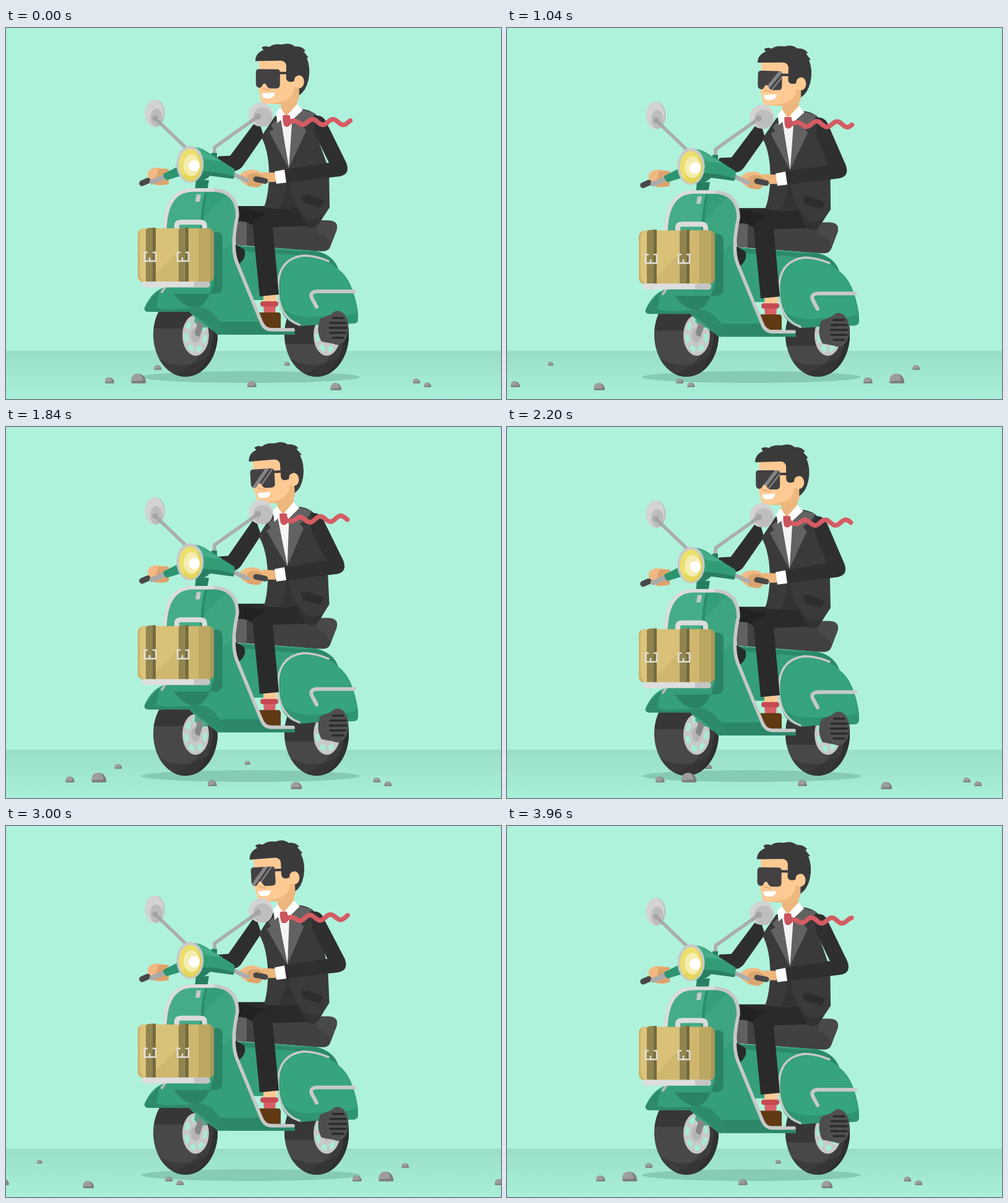
An HTML page that plays this animation: 800 by 600 pixels, repeating every 4 s.

```html
<!DOCTYPE html>
<html lang="en">
<head>
<meta charset="utf-8">
<title>Scooter ride</title>
<style>
html, body { margin: 0; width: 100%; height: 100%; overflow: hidden; background: #aff2dc; }
svg { display: block; width: 100vw; height: 100vh; }
.line { fill: none; stroke-linecap: round; stroke-linejoin: round; }
</style>
</head>
<body>
<svg viewBox="0 0 800 600">
<defs>
  <linearGradient id="road" x2="0" y2="1"><stop stop-color="#98dfc6"/><stop offset="1" stop-color="#a9f0d8"/></linearGradient>
  <clipPath id="tireClip"><ellipse cx="290" cy="496" rx="52" ry="68"/></clipPath>
  <clipPath id="bagClip"><rect x="213" y="324" width="123" height="87" rx="10"/></clipPath>
  <path id="lens" d="M408 67H437Q442 67 442 72V92Q442 98 436 98H427Q423 98 421 94Q417 86 413 94Q412 97 408 97Q403 96 403 90V72Q403 67 408 67Z"/>
  <clipPath id="lensClip"><use href="#lens"/></clipPath>
  <g id="tire" clip-path="url(#tireClip)">
    <rect x="238" y="425" width="106" height="140" fill="#484848"/>
    <path d="M342 425V565H245Q320 555 325 490L318 425Z" fill="#3c3c3c"/>
    <path d="M342 475V565H300Q345 530 332 455H342Z" fill="#303030"/>
    <path d="M238 530Q285 560 328 530V566H238Z" fill="#2f2f2f" opacity=".5"/>
  </g>
  <g id="rim">
    <g transform="translate(306.500 497) scale(.65 1)">
      <circle r="33" fill="#c8c8c8"/>
      <circle class="spokes" r="23.500" fill="none" stroke="#a4edd3" stroke-width="9" stroke-dasharray="13 8.090"/>
      <path d="M0-33A33 33 0 0 1 30-13L12-12L-4-22Z" fill="#2f8c6c" opacity=".7"/>
      <circle r="12" fill="#b5b5b5"/>
    </g>
    <path d="M312 470L319 482L313 499Q306 500 305 492Z" fill="#878787"/>
  </g>
</defs>

<rect width="800" height="600" fill="#aff2dc"/>
<rect y="522" width="800" height="78" fill="url(#road)"/>
<g id="farStones"></g>
<ellipse cx="395" cy="564.500" rx="177" ry="9.500" fill="#86cbb2"/>
<g transform="translate(212 0)">
  <use href="#tire"/>
  <g clip-path="url(#tireClip)"><rect class="shade" x="236" width="110" height="111" fill="#262626" opacity=".5"/></g>
  <use href="#rim"/>
</g>
<use href="#tire"/>
<g clip-path="url(#tireClip)"><rect class="shade" x="236" width="110" height="86" fill="#262626" opacity=".5"/></g>
<use href="#rim"/>

<g id="ride">
  <!-- rear body and seat -->
  <path d="M372 352L500 360Q529 367 537 390Q561 407 569 460V470Q569 478 561 478H520L476 482Q443 470 439 425L425 400V440H395L372 400Z" fill="#349f79"/>
  <path d="M470 361L500 361Q529 367 537 390Q520 372 480 368L376 360V352Z" fill="#2b8969"/>
  <path d="M371 350L385 358Q390 372 375 383L368 370Z" fill="#262c2a"/>
  <path d="M443 430Q442 374 480 371Q515 372 537 390Q558 414 564 450Q568 470 535 465L510 478Q450 482 443 430Z" fill="#36a47d"/>
  <path d="M443 450Q465 473 510 466Q550 468 567 460L569 470Q569 478 561 478L475 481Q450 477 443 450Z" fill="#2e9472"/>
  <path class="line" d="M521 377Q500 368 480 368Q444 373 440 410Q436 466 474 480" stroke="#c8c9c8" stroke-width="3.500"/>
  <path d="M370 313H520Q539 311 534 328L524 354Q521 362 509 361L372 351Z" fill="#414141"/>
  <path d="M370 313H389V352L372 351Z" fill="#606060"/>
  <path d="M500 311H520Q539 311 534 328L524 350Q519 334 505 332Z" fill="#494949"/>
  <path class="line" d="M563 426H503Q489 427 495 438L502 451" stroke="#c7c9c8" stroke-width="6"/>
  <path d="M508 470Q500 490 510 507L536 512V459Z" fill="#4d4d4d"/>
  <ellipse cx="536" cy="485" rx="17.500" ry="27.500" fill="#505050"/>
  <path class="line" d="M528 469H545M524 477H549M523 485H550M524 493H549M528 501H545" stroke="#2b2b2b" stroke-width="3.500"/>

  <!-- legs -->
  <path d="M416 428H437V446H416Z" fill="#fdc993"/>
  <path d="M416 448H436L435 462H417Z" fill="#d95f66"/>
  <rect x="411" y="442" width="29" height="8.500" rx="4" fill="#c74953"/>
  <path d="M407 460H441Q445 461 444 470V485H418Z" fill="#613a14"/>
  <path d="M374 288H430V318H396Q390 312 374 313Z" fill="#222"/>
  <path d="M376 289H475L497 320L431 322L441 431L410 434L398 313L420 300Z" fill="#2a2a2a"/>

  <!-- rider -->
  <g class="lean">
    <path d="M407 146L362 207L343 208L338 216L360 231Q374 234 382 224L416 175Z" fill="#2e2e2e"/>
    <path d="M434 143L412 176Q425 200 425 240Q424 272 417 290Q445 295 470 291L485 320Q495 327 504 319L523 290L522 238L508 152Q502 134 478 131Z" fill="#3a3a3a"/>
    <path d="M455 224Q456 272 441 292L470 291L485 320Q495 327 504 319L512 306Q485 317 476 294Q460 285 455 224Z" fill="#323232"/>
    <path d="M478 270L488 269L514 279L508 290L481 282Z" fill="#2d2d2d"/>
    <path d="M442 140H466L457 227Z" fill="#f3f3f3"/>
    <path d="M436 150L428 157L432 164L425 168L456 226L444 150ZM462 148L478 132L499 138L494 146L479 159L485 166L457 226Z" fill="#626262"/>
    <path d="M445 116H470V127L453 142L443 132Z" fill="#edb67c"/>
    <path d="M443 129L436 137L438 154L452 142ZM470 123L479 133L462 149L454 141Z" fill="#fff"/>
    <g id="head">
      <path d="M408 52H474V104Q472 122 450 123H418Q410 121 411 112L407 99L410 95Z" fill="#fdca94"/>
      <path d="M473 94V112Q470 124 445 124L420 122Q465 122 465 96Z" fill="#efb87e"/>
      <path d="M402 54Q402 41 415 36L412 32Q417 28 424 31Q432 25 445 27Q458 23 466 30Q477 29 483 37L480 38L488 48L485 48Q492 65 488 84Q484 102 473 109V78Q465 76 465 86Q454 90 452 82V61Q451 54 444 53Z" fill="#3a3a3a"/>
      <ellipse cx="473" cy="87" rx="8" ry="10.500" fill="#fdca94"/>
      <path d="M440 73H474" stroke="#3d3b3d" stroke-width="4"/>
      <path d="M414 98L425 101" class="line" stroke="#e7ae76" stroke-width="2"/>
      <use href="#lens" fill="#434143"/>
      <g clip-path="url(#lensClip)"><path id="glare" d="M0 98L25 66H32L7 98ZM11 98L36 66H39L14 98Z" fill="#858585"/></g>
      <path d="M413 106Q424 105 434 105Q433 114 424 114H419Q413 113 413 106Z" fill="#fff"/>
    </g>
  </g>
  <path id="gap" fill="#aff2dc"/>
  <path id="arm" fill="#2f2f2f"/>
  <g class="lean">
    <path id="tie" class="line" stroke="#d45c63" stroke-width="7.500"/>
    <path d="M447 141H458L461 154Q455 163 449 158Q446 150 447 141Z" fill="#cc545d"/>
  </g>
  <path d="M414 233L436 234V249H412Z" fill="#edb67c"/>
  <path d="M434 232L450 229L453 250L437 252Z" fill="#fff"/>

  <!-- leg shield and front fender -->
  <path d="M307 246H328L325 264H305Z" fill="#267f60"/>
  <path d="M257 322Q260 262 302 262H334Q374 263 374 304Q365 350 371 373L412 475Q417 488 428 489H467V496H344Q310 474 296 459H230Q222 458 224 452Q236 425 257 419Z" fill="#349f79"/>
  <path d="M260 324Q261 267 300 265H327Q317 290 317 324Z" fill="#44ad87"/>
  <path d="M317 308L358 269Q374 280 374 304L367 342L350 360V330H317Z" fill="#3da681"/>
  <path d="M321 266H326Q318 290 320 324H314Q315 290 321 266Z" fill="#2b8d6b"/>
  <path d="M330 330H342Q350 332 350 342V418Q350 430 337 430H271Q285 450 304 453Q318 454 329 431L336 411Z" fill="#2b8366"/>
  <path d="M248 424Q230 440 224 453Q224 459 230 459H296Q320 472 341 496H358Q334 448 310 453L258 455L243 452Z" fill="#2d8a6a"/>
  <path d="M346 475H412L419 488L467 490V496H358Z" fill="#2b8768"/>
  <path class="line" d="M257 322Q260 262 302 262H334Q374 263 374 304Q363 354 373 379L412 474Q417 488 429 488H464" stroke="#c7c8c8" stroke-width="5.500"/>
  <path class="line" d="M257 322Q260 262 302 262H334" stroke="#dcdcdc" stroke-width="5.500"/>
  <path d="M308 269H315L313 281H306Z" fill="#c9c9c9"/>

  <!-- suitcase on rack -->
  <path class="line" d="M276 325V320Q276 314 283 314H314Q321 314 321 321V325" stroke="#dcdcdc" stroke-width="8"/>
  <path class="line" d="M258 418L252 427" stroke="#b8bdba" stroke-width="4"/>
  <g clip-path="url(#bagClip)">
    <rect x="213" y="324" width="123" height="87" fill="#d9c177"/>
    <path d="M213 324H226V411H213Z" fill="#c9b168"/>
    <path d="M218 324H226V411H222Q216 405 216 390V340Q216 330 218 324Z" fill="#dcc47b"/>
    <path d="M296 324H311V411H230L296 344Z" fill="#cfb76e"/>
    <path d="M311 324H336V411H311Z" fill="#bba761"/>
    <path d="M330 324H336V411H330Z" fill="#aa975a"/>
  </g>
  <path d="M226 326Q228 323 234 323H242V410H226ZM279 326Q281 323 287 323H295V410H279Z" fill="#91854f"/>
  <path d="M237 323H242V410H237ZM290 323H295V410H290Z" fill="#746a40"/>
  <path class="line" d="M228 363H224V377H242V363H238M232 372V377M281 363H277V377H295V363H291M285 372V377" stroke="#e0dfd8" stroke-width="2.500"/>
  <rect x="219" y="410" width="111" height="9.500" rx="4.700" fill="#dedede"/>
  <path d="M304 410H325Q330 410 330 415T325 419.500H304Z" fill="#c4c4c4"/>

  <!-- handlebar -->
  <path d="M229 234Q233 225 246 226L263 228V252Q247 257 238 252Q228 249 229 234Z" fill="#f0b983"/>
  <path d="M246 228L263 228V252Q250 255 240 253Z" fill="#dca36c"/>
  <path class="line" d="M220 251L229 247" stroke="#484848" stroke-width="9.500"/>
  <path class="line" d="M236 249L258 240" stroke="#a9aaa9" stroke-width="8"/>
  <path d="M254 236L286 220V238L260 246Q254 243 254 236Z" fill="#2c9470"/>
  <path d="M376 240Q384 228 400 229Q417 231 417 247Q411 260 397 257Q380 253 376 240Z" fill="#f0bb85"/>
  <path d="M390 238Q405 230 416 241Q418 253 407 258L390 255Z" fill="#dca56e"/>
  <path class="line" d="M370 238L390 247" stroke="#acadac" stroke-width="7"/>
  <path class="line" d="M404 244.500L419 247.500" stroke="#484848" stroke-width="9"/>
  <path class="line" d="M243 148L291 194M406 144L337 193V205" stroke="#abadac" stroke-width="5.500"/>
  <path d="M332 202H341V216H332Z" fill="#267f60"/>
  <path d="M286 198Q303 188 320 197L342 211L369 228Q371 235 367 243L330 238Q318 250 297 249Z" fill="#329c77"/>
  <path d="M300 192Q313 192 325 202L342 211L350 216L320 212Z" fill="#43ad87"/>
  <path d="M318 232Q340 231 369 240L367 244L330 239Q320 249 307 248Z" fill="#297f62"/>
  <ellipse cx="297.500" cy="220.500" rx="22" ry="30" fill="#c9c9c9"/>
  <ellipse cx="297.500" cy="221" rx="18" ry="25.500" fill="#ebe06d"/>
  <path d="M285 241A18 25.500 0 0 0 311 204Z" fill="#e0d250" opacity=".6"/>
  <ellipse cx="300" cy="222" rx="13" ry="17.500" fill="#f5edb0"/>
  <circle cx="304" cy="223" r="9" fill="#fff"/>
  <ellipse cx="241.500" cy="138" rx="15" ry="22" fill="#bdbdbd"/>
  <ellipse cx="239.500" cy="138" rx="15" ry="22" fill="#d3d3d3"/>
  <ellipse cx="243" cy="145" rx="10" ry="15" fill="#bcbcbc"/>
  <circle cx="412" cy="140" r="19.500" fill="#d3d3d3"/>
  <circle cx="415" cy="144" r="15.500" fill="#bebebe"/>
  <path class="line" d="M241 146L250 155M407 143L396 151" stroke="#a5a6a5" stroke-width="5.500"/>
  <circle cx="241" cy="146" r="4.500" fill="#a3a3a3"/>
  <circle cx="407" cy="143" r="5" fill="#a3a3a3"/>
</g>
<g id="nearStones"></g>
</svg>

<script>
const LOOP = 4000, TAU = Math.PI * 2;
const byId = id => document.getElementById(id);
const put = (id, name, value) => byId(id).setAttribute(name, value);
const putAll = (selector, name, value) =>
  document.querySelectorAll(selector).forEach(el => el.setAttribute(name, value));
const clamp = v => Math.max(0, Math.min(1, v));

// A stone is drawn twice so that it can leave and enter the stage at once.
const dome = w => {
  const r = w / 2, h = w * .32;
  return `<path d="M${-r} ${h * .7}Q${-r} ${-h} ${-r * .1} ${-h}Q${r * .8} ${-h} ${r} ${h * .7}Q${r} ${h} ${r * .8} ${h}H${-r * .8}Q${-r} ${h} ${-r} ${h * .7}Z" fill="#7d7c7d"/>
    <path d="M${-r} ${h * .6}Q${-r} ${-h} ${-r * .1} ${-h}Q${r * .4} ${-h} ${r * .6} ${h * .4}Z" fill="#9e9d9e"/>`;
};
const addStones = (id, list) => list.map(([x, y, w]) => {
  const stone = document.createElementNS("http://www.w3.org/2000/svg", "g");
  stone.innerHTML = dome(w) + `<g transform="translate(-800)">${dome(w)}</g>`;
  byId(id).append(stone);
  return { stone, x, y };
});
const stones = [
  ...addStones("farStones", [[245, 549, 12], [454, 543, 9]]),
  ...addStones("nearStones", [[167, 570, 15], [214, 567, 24], [397, 576, 15],
    [533, 580, 18], [663, 571, 12], [681, 577, 12]])
];

function tiePath(t) {
  let d = "M454 152";
  for (let x = 458; x <= 556; x += 2) {
    const amplitude = 4.5 * Math.min(1, (x - 454) / 25);
    const y = 152 - amplitude * Math.cos(TAU * ((x - 462) / 33 - 12 * t / LOOP));
    d += `L${x} ${y.toFixed(2)}`;
  }
  return d;
}

function draw(now) {
  const t = now % LOOP;
  const cycle = (3 * t / LOOP) % 1;
  const bounce = -3.3 * Math.sin(TAU * cycle);
  const sway = Math.cos(TAU * (cycle - .853)) - .45;
  const reach = Math.cos(TAU * t / LOOP);

  for (const { stone, x, y } of stones) {
    // The margin keeps both copies in play across the wrap.
    const px = (x + t * .4 - 15) % 800 + 15;
    stone.setAttribute("transform", `translate(${px} ${y})`);
  }
  putAll(".spokes", "transform", `rotate(${-1800 * t / LOOP})`);
  putAll(".shade", "y", 400 + bounce);

  put("ride", "transform", `translate(0 ${bounce})`);
  putAll(".lean", "transform", `rotate(${1.15 * sway} 485 305)`);
  put("head", "transform", `rotate(${1.2 * sway} 458 130)`);
  put("tie", "d", tiePath(t));

  const shoulder = 3 * sway - 1, elbow = 2.5 * reach - 3.5;
  put("arm", "d", `M${499 + shoulder} 142Q${514 + shoulder} 139 ${520 + shoulder} 156L${551 + elbow} 218
    Q${558 + elbow} 237 ${540 + elbow} 240L453 250L450 229L${523 + elbow} 218L${499 + shoulder} 170Z`);
  put("gap", "d", `M${504 + shoulder} 178L${523 + elbow} 218L${519 + elbow} 218Z`);
  put("gap", "opacity", clamp(reach * 2));

  put("glare", "transform", `translate(${394 + 24 * cycle} 0)`);
  put("glare", "opacity", clamp(Math.min(cycle * 12 - .3, (.93 - cycle) * 8)));
}

const start = performance.now();
function frame() {
  draw(performance.now() - start);
  requestAnimationFrame(frame);
}
frame();
</script>
</body>
</html>
```
